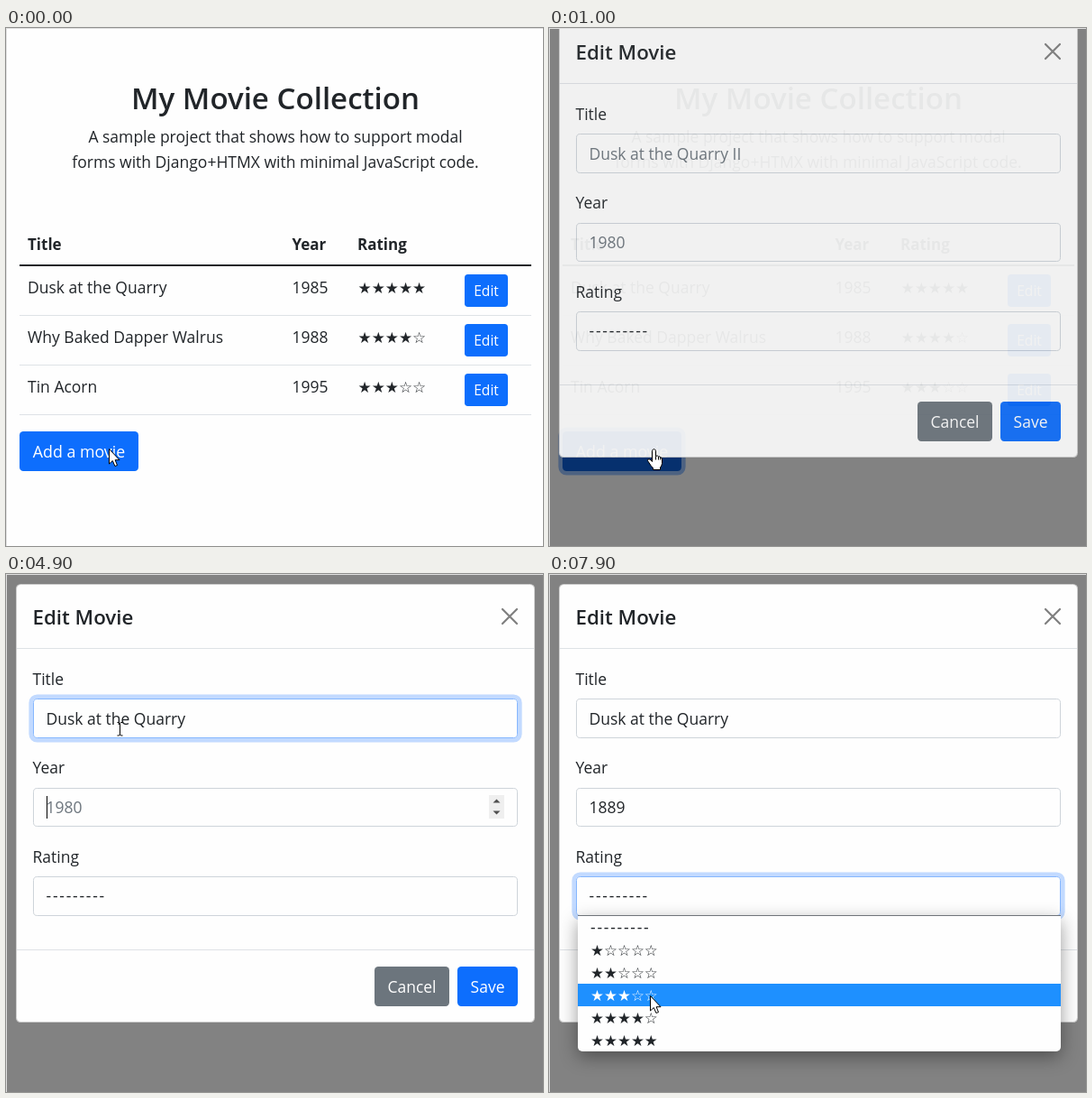
Recreate the animation shown at these times as an HTML page with a canvas. Size 596 by 574 pixels, loop 8000 ms.

```html
<!DOCTYPE html>
<html lang="en">
<head>
<meta charset="utf-8">
<title>My Movie Collection</title>
<style>
html, body { margin: 0; width: 100%; height: 100%; overflow: hidden; background: #fefefe; }
canvas { display: block; width: 596px; height: 574px; }
</style>
</head>
<body>
<canvas id="stage"></canvas>
<script>
const W = 596, H = 574, LOOP = 8000, STEP = 100;
const dpr = window.devicePixelRatio || 1;
const stage = document.getElementById('stage');
const layer = document.createElement('canvas');
for (const c of [stage, layer]) {
  c.width = W * dpr;
  c.height = H * dpr;
  c.getContext('2d').scale(dpr, dpr);
}
const page = stage.getContext('2d'), sheet = layer.getContext('2d');
let g = page;

const INK = '#212529', BLUE = '#0d6efd', GRAY = '#6c757d', PAPER = '#fefefe';
const SANS = '"Open Sans", "Noto Sans", sans-serif';
const STAR = '"DejaVu Sans", sans-serif';
const BODY = 17.5;

const TITLE = 'Dusk at the Quarry';
const MOVIES = [[TITLE, 1985, 5], ['Why Baked Dapper Walrus', 1988, 4], ['Tin Acorn', 1995, 3]];
// Time of each key press
const TITLE_KEYS = [2500, 2600, 2700, 2800, 2800, 3100, 3200, 3300, 3600, 3700,
  3800, 3900, 4000, 4100, 4100, 4300, 4300, 4300];
const YEAR_KEYS = [5300, 6000, 6100, 6200];
const CARET_OFF = [[2300, 2500], [4600, 4900], [5600, 5900]];
const FOCUS = { title: [1900, 4900], year: [4900, 6500], rating: [6500, LOOP + 500] };
const OPEN = 7200, LIST_TOP = 379, ROW = 25;
// Pointer path: time, x, y
const PATH = [[0, 114.5, 466.5], [1250, 114.5, 466.5], [1850, 126.5, 171.5], [6650, 126.5, 171.5],
  [7150, 117.5, 347.5], [7300, 117.5, 347.5], [7850, 112.5, 467.5]];

const ramp = (t, start, len) => Math.min(1, Math.max(0, (t - start) / len));
const soft = (t, start) => 1 - (1 - ramp(t, start, 150)) ** 2;
const stars = n => '★'.repeat(n) + '☆'.repeat(5 - n);
const typed = (text, keys, t) => text.slice(0, keys.filter(k => k <= t).length);
const during = (t, [a, b]) => t >= a && t < b;
const glow = (t, [a, b]) => soft(t, a) - soft(t, b);

function mix(a, b, p) {
  const part = (c, i) => parseInt(c.slice(i, i + 2), 16);
  return `rgb(${[1, 3, 5].map(i => Math.round(part(a, i) + (part(b, i) - part(a, i)) * p))})`;
}

function rect(x, y, w, h, color) {
  g.fillStyle = color;
  g.fillRect(x, y, w, h);
}

function box(x, y, w, h, r, fill, border) {
  g.beginPath();
  g.roundRect(x, y, w, h, r);
  if (fill) { g.fillStyle = fill; g.fill(); }
  if (border) {
    g.beginPath();
    g.roundRect(x + .5, y + .5, w - 1, h - 1, r - .5);
    g.strokeStyle = border;
    g.lineWidth = 1;
    g.stroke();
  }
}

function ring(x, y, w, h, color) {
  g.beginPath();
  g.roundRect(x - 2.3, y - 2.3, w + 4.6, h + 4.6, 7);
  g.strokeStyle = color;
  g.lineWidth = 4.6;
  g.stroke();
}

function text(str, x, y, { size = BODY, weight = 400, color = INK, align = 'left', family = SANS, gap = 0 } = {}) {
  g.font = `${weight} ${size}px ${family}`;
  g.textAlign = align;
  g.letterSpacing = gap + 'px';
  g.fillStyle = color;
  g.fillText(str, x, y);
  return g.measureText(str).width;
}

function button(label, x, y, w, h, color, size = BODY) {
  box(x, y, w, h, size / 4.2, color);
  text(label, x + w / 2, y + h / 2 + size * .36 + .2, { size, color: '#fff', align: 'center' });
}

function drawPage(t) {
  rect(0, 0, W, H, PAPER);
  text('My Movie Collection', 299, 90, { size: 33.1, weight: 600, align: 'center' });
  text('A sample project that shows how to support modal', 299, 127, { align: 'center' });
  text('forms with Django+HTMX with minimal JavaScript code.', 299, 155, { align: 'center' });

  const bold = { size: 17, weight: 700 };
  text('Title', 24, 246, bold);
  text('Year', 317.5, 246, bold);
  text('Rating', 390, 246, bold);
  rect(15, 262, 568, 2, INK);
  MOVIES.forEach(([name, year, score], i) => {
    const y = 264 + i * 55;
    text(name, 24, y + 30);
    text(year, 317.5, y + 30);
    text(stars(score), 390.5, y + 29.5, { size: 16.9, family: STAR });
    button('Edit', 509, y + 9, 48, 36, BLUE, 15.6);
    rect(15, y + 54, 568, 1, '#dee2e6');
  });

  const focus = soft(t, 550) - soft(t, 1500);
  if (focus > 0) ring(15, 447, 132, 44, `rgba(49,132,253,${.5 * focus})`);
  button('Add a movie', 15, 447, 132, 44, mix(BLUE, '#0b5ed7', soft(t, 50)), 17.8);
}

function field(y, h, f) {
  if (f > 0) ring(30, y, 538, h, `rgba(13,110,253,${.25 * f})`);
  box(30, y, 538, h, 4.6, PAPER, mix('#ced4da', '#86b7fe', f));
}

function entry(value, hint, y, t, active) {
  const w = value ? text(value, 44.5, y) : 0;
  if (!value) text(hint, 44.5, y, { color: GRAY });
  if (active && !CARET_OFF.some(o => during(t, o))) rect(Math.round(44.5 + w), y - 19, 1, 25, '#000');
}

function spinner() {
  rect(536, 245, 17, 26, '#efefef');
  g.fillStyle = '#505050';
  for (const d of [-1, 1]) {
    g.beginPath();
    g.moveTo(540.5, 258 + d * 4.5);
    g.lineTo(548.5, 258 + d * 4.5);
    g.lineTo(544.5, 258 + d * 8.5);
    g.fill();
  }
}

function drawModal(t) {
  box(11, 11, 576, 486, 5.5, PAPER, 'rgba(0,0,0,.2)');
  text('Edit Movie', 29.5, 55.5, { size: 22.3, weight: 600 });
  g.strokeStyle = '#7f7f7f';
  g.lineWidth = 2.2;
  g.lineCap = 'round';
  g.beginPath();
  for (const d of [-1, 1]) {
    g.moveTo(559 - 8 * d, 39);
    g.lineTo(559 + 8 * d, 55);
  }
  g.stroke();
  g.lineCap = 'butt';
  rect(12, 82, 574, 1, '#dee2e6');
  rect(12, 416, 574, 1, '#dee2e6');

  text('Title', 29.5, 123);
  text('Year', 29.5, 221);
  text('Rating', 29.5, 320);
  field(138, 44, glow(t, FOCUS.title));
  field(237, 43, glow(t, FOCUS.year));
  field(335, 44, glow(t, FOCUS.rating));
  entry(typed(TITLE, TITLE_KEYS, t), TITLE + ' II', 167, t, during(t, FOCUS.title));
  entry(typed('1889', YEAR_KEYS, t), '1980', 265, t, during(t, FOCUS.year));
  if (during(t, FOCUS.year)) spinner();
  text('---------', 44.5, 363, { gap: 1.75 });

  button('Cancel', 409, 435, 83, 44, GRAY);
  button('Save', 501, 435, 67, 44, BLUE);
}

function drawList(y) {
  const h = ROW * 6;
  g.save();
  g.shadowColor = 'rgba(0,0,0,.4)';
  g.shadowBlur = 20 * dpr;
  g.shadowOffsetY = 6 * dpr;
  box(32, LIST_TOP, 536, h, [0, 0, 5, 5], PAPER);
  g.restore();
  const picked = Math.max(0, Math.floor((y - LIST_TOP) / ROW));
  rect(32, LIST_TOP + picked * ROW, 536, ROW, '#1e90ff');
  for (let i = 0; i < 6; i++) {
    const color = i === picked ? '#fff' : INK, base = LIST_TOP + i * ROW + 18.5;
    if (i) text(stars(i), 46, base, { size: 16.7, family: STAR, color });
    else text('---------', 46, base, { gap: 1.75, color });
  }
  rect(32, LIST_TOP - 1, 536, 1, '#70757a');
}

function pointerAt(t) {
  const i = PATH.findLastIndex(k => k[0] <= t);
  const a = PATH[i], b = PATH[i + 1] || a;
  const p = a === b ? 0 : ramp(t, a[0], b[0] - a[0]);
  const e = p * p * (3 - 2 * p);
  return [a[1] + (b[1] - a[1]) * e, a[2] + (b[2] - a[2]) * e];
}

const ARROW = new Path2D('M0 0V16.5L3.8 13L6.4 19L9 18L6.6 12.2H11.5Z');
const HAND = new Path2D('M0 2Q2 -2 4 2V8Q6 6.5 7 8.5Q8.6 7.5 9.2 9.5Q11 9 11 11.5V16Q10.5 19 9 20.5V23H1V21L-1 19L-5 13Q-5.5 10.5 -2.5 11.5L0 14Z');
const KNUCKLES = new Path2D('M4 8V12M7 8.5V12M9.2 9.5V12');
const BEAM = new Path2D('M-3 -7H-1L0 -6L1 -7H3M0 -6V6.5M-3 7.5H-1L0 6.5L1 7.5H3');

function drawPointer(t, x, y) {
  const onField = (y > 138 && y < 182) || (y > 237 && y < 280);
  const shape = t >= 100 && t < 1300 ? HAND : onField ? BEAM : ARROW;
  g.save();
  g.translate(x, y);
  g.lineWidth = 1;
  g.lineJoin = 'round';
  g.strokeStyle = '#000';
  g.fillStyle = '#fff';
  if (shape !== BEAM) g.fill(shape);
  g.stroke(shape);
  if (shape === HAND) g.stroke(KNUCKLES);
  g.restore();
}

function draw(t) {
  g = page;
  drawPage(t);
  rect(0, 0, W, H, `rgba(0,0,0,${.49 * ramp(t, 719, 150)})`);

  const alpha = ramp(t, 865, 150);
  if (alpha > 0) {
    g = sheet;
    g.clearRect(0, 0, W, H);
    drawModal(t);
    g = page;
    const lift = 57.5 * (1 - ramp(t, 865, 300)) ** 1.66;
    g.globalAlpha = alpha;
    g.drawImage(layer, 0, -Math.round(lift), W, H);
    g.globalAlpha = 1;
  }

  const [x, y] = pointerAt(t);
  if (t >= OPEN) drawList(y);
  drawPointer(t, x, y);
  rect(0, 0, W, 1, '#dedede');
  rect(0, 0, 1, H, '#dedede');
}

const begin = performance.now();
function tick() {
  const t = (performance.now() - begin) % LOOP;
  draw(Math.floor(t / STEP) * STEP);
  requestAnimationFrame(tick);
}
tick();
</script>
</body>
</html>
```
